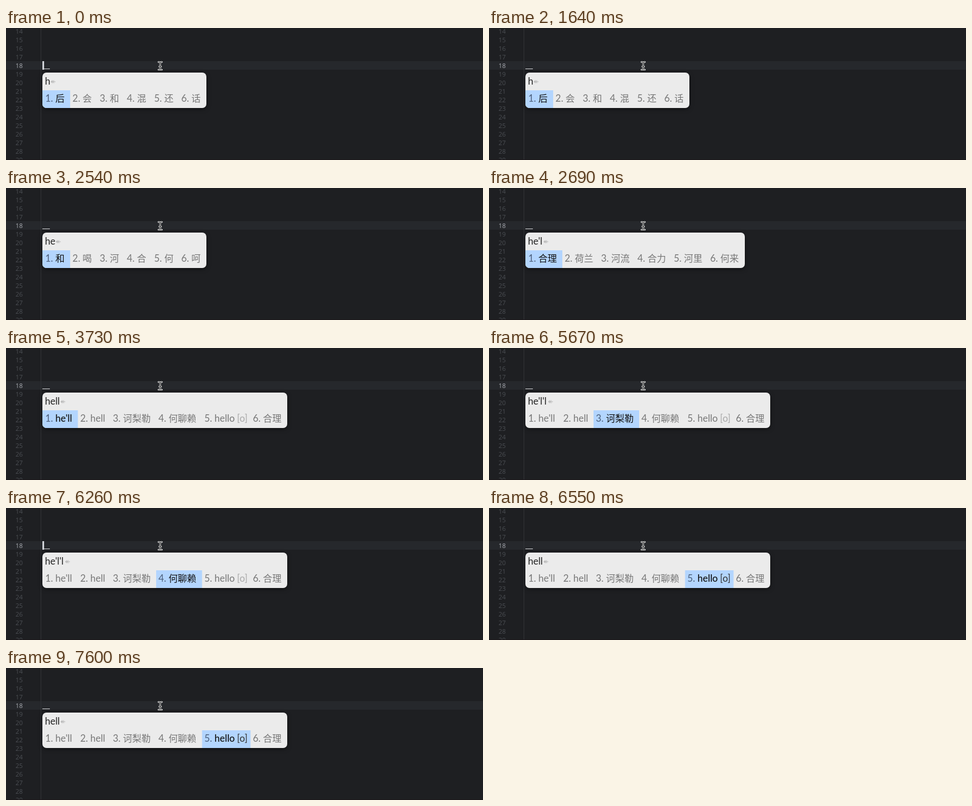
These frames come from a looping animation (826 by 231 pixels, 8000 ms). An HTML page:

```html
<!DOCTYPE html>
<html lang="zh-CN">
<head>
<meta charset="utf-8">
<title>Input method</title>
<style>
html, body { margin: 0; width: 100%; height: 100%; overflow: hidden; background: #1e1f22; }
svg { display: block; }
#editor { position: absolute; left: 0; top: 0; font: 11px "Open Sans", sans-serif; }
#popup {
  position: absolute; left: 63px; top: 78px; height: 62px; overflow: hidden;
  border-radius: 7px; background: #ebebeb; box-shadow: 0 2px 7px rgba(0, 0, 0, .5);
  font: 16.5px Lato, "Noto Sans CJK SC", sans-serif;
}
.word { fill: #777; }
.hint { fill: #aaa; }
.picked .label { fill: #4c5f7c; }
.picked .word { fill: #111; font-weight: 500; }
.picked .hint { fill: #333; }
.label { fill: #777; }
.han { font-size: 16px; }
</style>
</head>
<body>
<svg id="editor" width="826" height="231">
  <rect y="58" width="826" height="15" fill="#26282c"/>
  <rect x="60" width="1" height="231" fill="#313337"/>
  <g id="lines" text-anchor="end"></g>
  <rect y="230" width="826" height="1" fill="#1c171b"/>
  <rect x="63" y="71" width="13" height="1" fill="#d5d6d9"/>
  <rect id="caret" x="63" y="58" width="3" height="15" fill="#ced0d6"/>
  <g fill="none" stroke-linecap="round">
    <path id="beam" d="M264 59.5h1.5l1.5 1.5 1.5-1.5h1.5M264 73h1.5l1.5-1.5 1.5 1.5h1.5M267 61v10.5M265.5 67.5h3" stroke="#eee" stroke-width="2.6"/>
    <use href="#beam" id="core"/>
    <path d="M264.5 59.5h1l1.5 1.5 1.5-1.5h1M264.5 73h1l1.5-1.5 1.5 1.5h1M267 61v10.5M266 67.5h2" stroke="#111" stroke-width="1"/>
  </g>
</svg>
<div id="popup"></div>
<script>
const LOOP = 8000;
const blinks = [600, 1050, 1640, 2090, 2540, 3130, 3580, 4030, 4630, 5070, 5670, 6110, 6550, 7150, 7600];
const spaced = step => [0, 1, 2, 3, 4, 5].map(i => 5 + i * step);

// Candidate lists: words, left edges and panel width
const lists = {
  h: { words: "后 会 和 混 还 话", xs: spaced(47.1), width: 284 },
  he: { words: "和 喝 河 合 何 呵", xs: spaced(47.1), width: 284 },
  hel: { words: "合理 荷兰 河流 合力 河里 何来", xs: spaced(63), width: 380 },
  hell: { words: "he'll hell 诃梨勒 何聊赖 hello 合理", xs: [5, 65.5, 122, 201, 280.5, 364.5], width: 424 }
};

// Start time, list, typed text, arrow position, selected index
const steps = [
  [0, "h", "h", 14, 0],
  [1940, "he", "he", 23, 0],
  [2690, "hel", "he'l", 31, 0],
  [3730, "hell", "hell", 31, 0],
  [5370, "hell", "hell", 31, 1],
  [5670, "hell", "he'l'l", 39, 2],
  [6260, "hell", "he'l'l", 39, 3],
  [6550, "hell", "hell", 31, 4]
];

const byId = id => document.getElementById(id);
byId("core").remove();

for (let n = 14; n < 30; n++) {
  byId("lines").innerHTML +=
    `<text x="29" y="${10 + (n - 14) * 15}" fill="${n === 18 ? "#a9acb2" : "#4b4e53"}">${n}</text>`;
}

function candidate(word, i, xs, selected) {
  const x = xs[i], left = i ? x - 4 : 0, picked = i === selected;
  const kind = /[a-z]/.test(word) ? "word" : "word han";
  const box = picked ? `<rect x="${left}" y="31" width="${xs[i + 1] - 4 - left}" height="31" fill="#b3d5fe"/>` : "";
  const hint = word === "hello" ? `<text class="hint" x="${x + 56.5}" y="51">[o]</text>` : "";
  return `<g class="${picked ? "picked" : ""}">${box}<text class="label" x="${x}" y="51">${i + 1}.</text>` +
    `<text class="${kind}" x="${x + 17.5}" y="51">${word}</text>${hint}</g>`;
}

function showPanel([, name, typed, arrow, selected]) {
  const { words, xs, width } = lists[name];
  byId("popup").style.width = width + "px";
  byId("popup").innerHTML = `<svg width="${width}" height="62">
    <text x="4.5" y="21" fill="#222">${typed}</text>
    <path d="M${arrow + 1} 16h7.5m-5-2.5l-2.5 2.5 2.5 2.5m2.5-5l-2.5 2.5 2.5 2.5" fill="none" stroke="#aaa"/>
    ${words.split(" ").map((word, i) => candidate(word, i, xs, selected)).join("")}</svg>`;
}

let shown;
function draw(now) {
  const t = now % LOOP;
  const step = steps.filter(s => s[0] <= t).pop();
  if (step !== shown) showPanel(shown = step);
  byId("caret").style.opacity = blinks.filter(b => b <= t).length % 2 ? 0 : 1;
}

const start = performance.now();
function tick() {
  draw(performance.now() - start);
  requestAnimationFrame(tick);
}
tick();
</script>
</body>
</html>
```
